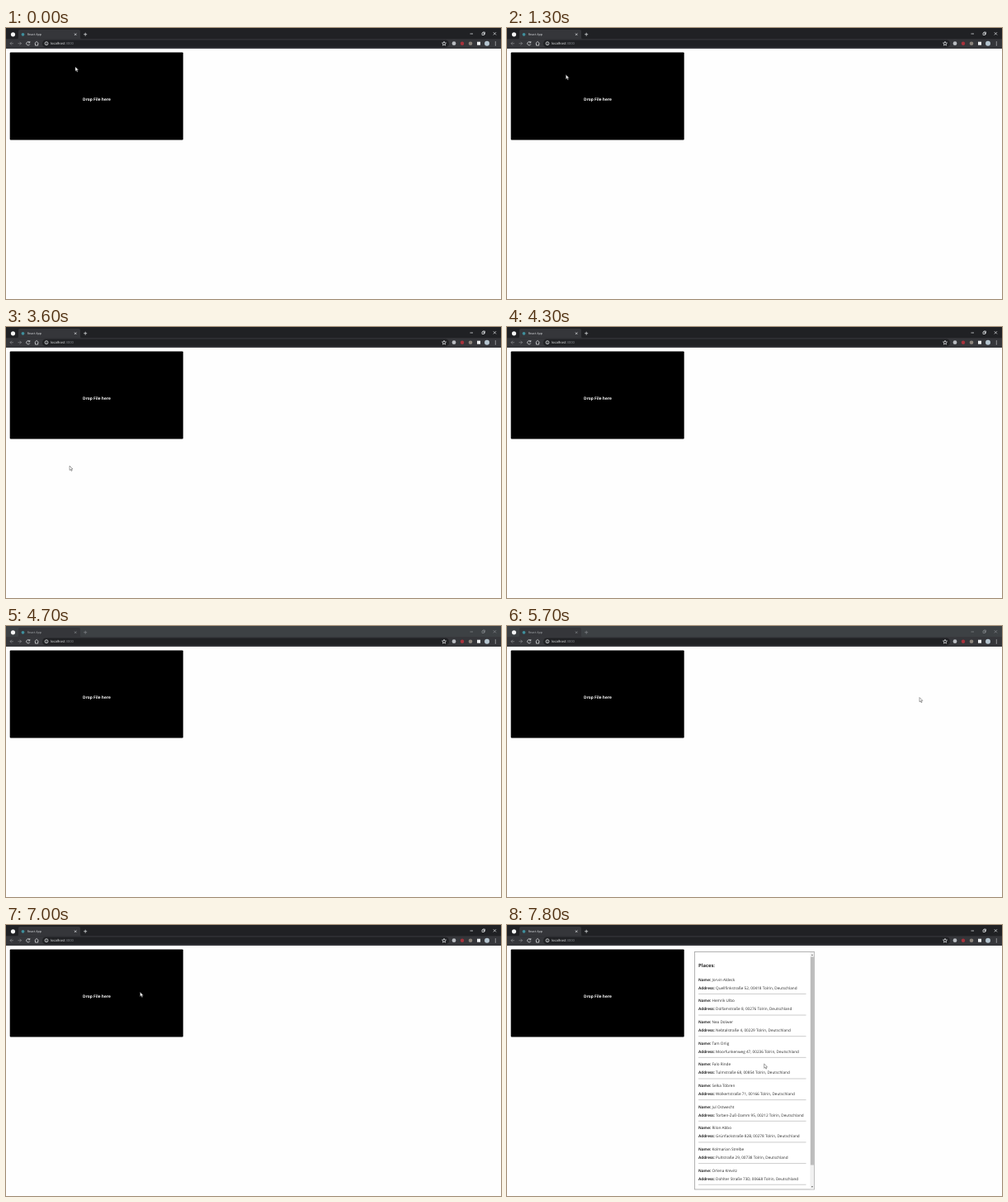
An HTML page that plays this animation: 600x328 px, repeating every 8 s.

```html
<!DOCTYPE html>
<html lang="de">
<head>
<meta charset="utf-8">
<title>React App</title>
<style>
  html, body { margin: 0; height: 100%; overflow: hidden; background: #fefefe; }
  svg { display: block; width: 600px; height: 328px; font: 4.66px "Open Sans", "Noto Sans", sans-serif; text-rendering: geometricPrecision; }
  .bold { font-weight: 700; }
  .line { fill: none; stroke: #d4d6d9; stroke-width: .8; }
  #strip { fill: #202124; }
  #tabText { fill: #dfe1e5; }
  .blur #strip { fill: #3d4144; }
  .blur #tabText { fill: #a9acb0; }
  .blur .dim { stroke: #7d8185; }
</style>
</head>
<body>
<svg id="stage" viewBox="0 0 600 328">
  <rect width="600" height="328" fill="#fefefe"/>

  <!-- Tab strip -->
  <rect id="strip" width="600" height="14"/>
  <path d="M13 13.5q2 0 2-2V4q0-2 2-2h71q2 0 2 2v7.5q0 2 2 2z" fill="#35363a"/>
  <circle cx="8.500" cy="7.800" r="2.600" fill="#f4f4f4"/>
  <circle cx="20.500" cy="7.800" r="1.900" fill="#3f8f9c"/>
  <text id="tabText" x="25.800" y="9.200" font-size="3.700">React App</text>
  <path class="line dim" d="M83 6.500l2.400 2.400m0-2.400l-2.400 2.400M94.200 7.700h4m-2-2v4M562.500 7h3.500M577 6h2.500v2.500H577zM578 6v-1h2.500v2.500h-1M590.800 5.200l3.200 3.200m0-3.200l-3.200 3.200"/>

  <!-- Toolbar -->
  <rect y="13.300" width="600" height="11.700" fill="#35363a"/>
  <rect x="44" y="14.500" width="493" height="8.800" rx="4.400" fill="#202124"/>
  <path class="line" stroke-opacity=".45" d="M9 18.700H5m2-2l-2 2 2 2M14.500 18.700h4m-2-2l2 2-2 2"/>
  <path class="line" d="M28.500 17.500a2.100 2.100 0 1 0 .3 2M28.800 16v1.800H27M34.700 18.700l2.400-2.300 2.400 2.300M35.500 18.500v2.600h3.200v-2.600"/>
  <circle class="line" cx="49" cy="18.700" r="2"/>
  <path class="line" d="M49 18.400v1.300M49 17.300v.5"/>
  <text x="54" y="20.300" font-size="4.150" fill="#f1f3f4">localhost<tspan fill="#8b8f94">:3000</tspan></text>
  <path class="line" d="M531 16.300l.7 1.700 1.800.1-1.400 1.200.5 1.800-1.600-1-1.600 1 .5-1.800-1.400-1.200 1.800-.1z"/>
  <circle cx="543" cy="18.700" r="2.400" fill="#b9bcc1"/>
  <circle cx="553" cy="18.700" r="2.200" fill="#a8323c"/>
  <circle cx="563" cy="18.700" r="2.300" fill="#8c857d"/>
  <rect x="571" y="16.700" width="4" height="4" fill="#eceef0"/>
  <circle cx="583" cy="18.700" r="3" fill="#b5c5d0"/>
  <path d="M593.300 16.500v5" stroke="#dcdee1" stroke-dasharray="1 .9"/>

  <!-- Drop zone -->
  <rect x="4.700" y="29.600" width="210" height="106" rx="1"/>
  <text class="bold" x="110" y="88.200" font-size="4.850" text-anchor="middle" fill="#fff">Drop File here</text>

  <g id="places" fill="#2b2b2b">
    <rect x="227.500" y="32.500" width="145" height="287.500" fill="#fff" stroke="#a0a0a0" stroke-width=".8"/>
    <rect x="367.400" y="33" width="4.800" height="286.500" fill="#f1f1f1"/>
    <rect x="367.900" y="38.500" width="4" height="252" fill="#bcbcbc"/>
    <path d="M368.700 36.800l1.200-1.400 1.200 1.400zM368.700 316.300l1.200 1.400 1.200-1.400z" fill="#555"/>
    <text class="bold" x="232" y="51.400" font-size="5.850">Places:</text>
  </g>

  <path id="cursor" d="M0 0v5.300l1.250-1.100.9 2 .9-.4-.9-1.950h1.700z" fill="#fff" stroke="#444" stroke-width=".5"/>
</svg>
<script>
const $ = id => document.getElementById(id);

const people = {
  "Jorvin Aldeck": "Quellfinkstraße 52, 00418",
  "Hemrik Ulbo": "Dolfamstraße 8, 00276",
  "Nea Dolwer": "Nebtalstraße 4, 00229",
  "Tam Orlig": "Moorfunkenweg 47, 00236",
  "Falo Rinde": "Tulmstraße 68, 00854",
  "Selka Töbren": "Wolkertstraße 71, 00166",
  "Jul Ostwecht": "Torben-Zuß-Damm 95, 00212",
  "Rilon Abbo": "Grünfackstraße 82B, 00278",
  "Kolmarian Strelbe": "Pultstraße 29, 00738",
  "Orlena Krevitz": "Dohlter Straße 73D, 00668",
};

const field = (label, value, y) =>
  `<text x="232" y="${y}"><tspan class="bold">${label}:</tspan> ${value}</text>`;

$("places").innerHTML += Object.entries(people).map(([name, street], i) => {
  const y = 67.7 + i * 25.65;
  return field("Name", name, y) +
    field("Address", street + " Tolrin, Deutschland", y + 10.1) +
    `<path d="M232 ${y + 15.7}h130.5" stroke="#aaa" stroke-width=".6"/>`;
}).join("");

// Each pointer move is a quadratic curve: start and end time, then from, control, to
const moves = [
  [1200, 2000, [84, 47], [0, 80], [452, 198]],
  [2400, 3300, [113, 165], [40, 390], [40, 215]],
  [3300, 4300, [40, 215], [124, 69], [60, 375]],
  [4700, 5700, [-8, 285], [457, 76], [500, 86.5]],
  [5900, 6800, [500, 86.5], [330, 86], [162.6, 81.3]],
  [7700, 7800, [162.6, 81.3], [237, 125], [311.7, 168]],
];

// The pointer rests one step after a move, then waits where the next one begins
function pointerAt(t) {
  const [start, end, from, via, to] = moves.find(m => t <= m[1] + 100);
  const k = Math.min(1, Math.max(0, (t - start) / (end - start)));
  return from.map((p, i) => p * (1 - k) ** 2 + 2 * via[i] * k * (1 - k) + to[i] * k * k);
}

function draw(now) {
  const t = Math.floor(now % 8000 / 100) * 100;
  $("stage").classList.toggle("blur", t >= 4700 && t < 7000);
  $("places").style.display = t >= 7100 ? "" : "none";
  $("cursor").setAttribute("transform", `translate(${pointerAt(t)})`);
  requestAnimationFrame(draw);
}
draw(performance.now());
</script>
</body>
</html>
```
